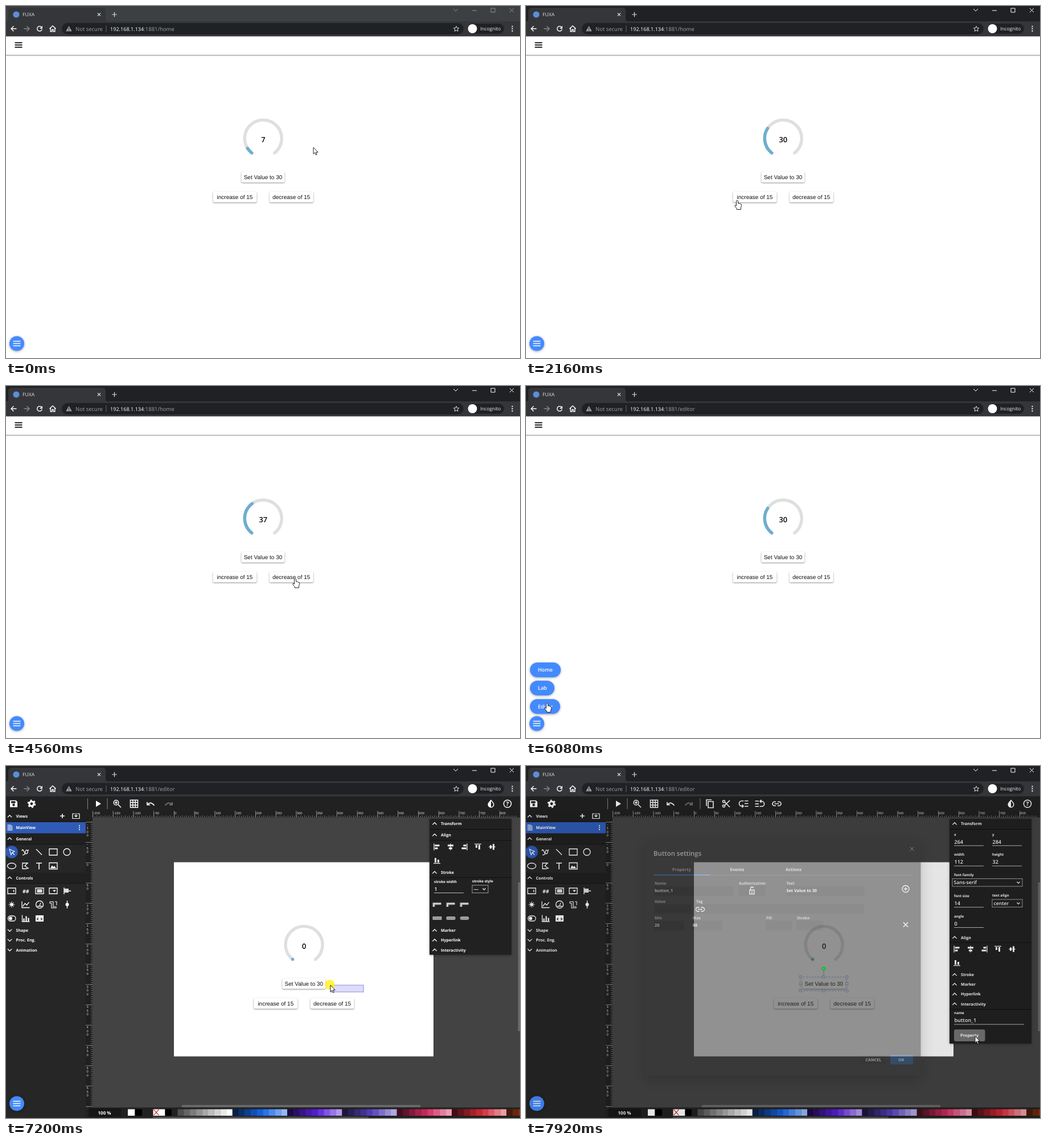
Animation of 903 by 620 pixels, one loop 8000 ms. Source, as an HTML page:

```html
<!DOCTYPE html>
<html lang="en">
<head>
<meta charset="utf-8">
<title>FUXA</title>
<style>
html, body { margin: 0; width: 100%; height: 100%; overflow: hidden; background: #fff; }
svg { display: block; width: 903px; height: 620px; font-family: "Open Sans", "Noto Sans", sans-serif; text-rendering: geometricPrecision; }
.btn { font: 10px "Liberation Sans", Arial, sans-serif; text-anchor: middle; fill: #111; }
.rule { font: 5.8px "Liberation Sans", Arial, sans-serif; fill: #ddd; }
.raised { filter: drop-shadow(0 1px 1.1px rgba(0,0,0,.45)); }
.float { filter: drop-shadow(0 1.5px 2px rgba(0,0,0,.35)); }
.deep { filter: drop-shadow(0 7px 12px rgba(0,0,0,.35)); }
</style>
</head>
<body>
<svg id="stage" viewBox="0 0 903 620"></svg>
<script>
const LOOP = 8000, STEP = 80;

// ---- drawing helpers
const rect = (x, y, w, h, fill, more = '') =>
  `<rect x="${x}" y="${y}" width="${w}" height="${h}" fill="${fill}" ${more}/>`;
const dot = (x, y, r, fill, more = '') =>
  `<circle cx="${x}" cy="${y}" r="${r}" fill="${fill}" ${more}/>`;
const ring = (x, y, r, w = 1.4) => dot(x, y, r, 'none', `stroke="#fff" stroke-width="${w}"`);
const text = (x, y, s, size = 7.1, fill = '#fff', more = '') =>
  `<text x="${x}" y="${y}" font-size="${size}" fill="${fill}" ${more}>${s}</text>`;
const bold = (x, y, s, size = 7.1, fill = '#fff') => text(x, y, s, size, fill, 'font-weight="700"');
const line = (x, y, d, c = '#fff', w = 1.3) =>
  `<path transform="translate(${x} ${y})" d="${d}" fill="none" stroke="${c}" stroke-width="${w}"/>`;
const solid = (x, y, d, c = '#fff') =>
  `<path transform="translate(${x} ${y})" d="${d}" fill="${c}" fill-rule="evenodd"/>`;
const group = (id, body, more = '') => `<g id="${id}" ${more}>${body}</g>`;
const range = (n, f) => Array.from({ length: n }, (_, i) => f(i)).join('');

const UP = 'M-3.7 1.9L0-1.8L3.7 1.9', DOWN = 'M-3.7-1.9L0 1.8L3.7-1.9';
const CROSS = 'M-3.5-3.5L3.5 3.5M3.5-3.5L-3.5 3.5';
const BARS = 'M-6.5-4H6.5M-6.5 0H6.5M-6.5 4H6.5';
const BOX = 'M-7-5.5H7V5.5H-7Z';
const LINK = 'M-1.5-3.5H-4A3.5 3.5 0 0 0-4 3.5H-1.5M1.5-3.5H4A3.5 3.5 0 0 1 4 3.5H1.5M-4 0H4';
const UNDO = 'M-6-3V2H-1M-5.5 1.5Q0-5 6.5 3';
const ORDER = 'M2-5H8.5M2-.3H8.5M2 4.5H8.5M.5-5H-3A4.6 4.6 0 0 0-3 4.2H-1M-2.6 1.6L0 4.2L-2.6 6.8';

// ---- browser frame
function chrome() {
  const grey = '#9aa0a6';
  return rect(0, 0, 903, 28, '#202124', 'id="bar"') +
    solid(0, 0, 'M0 27Q4 27 4 23V9Q4 3 10 3H169Q175 3 175 9V23Q175 27 179 27V28H0Z', '#35363a') +
    rect(0, 27, 903, 26.5, '#35363a') +
    dot(18, 15, 5.6, '#5b8fd6') + text(29, 18, 'FUXA', 8.6, '#dfe1e5') +
    line(163.5, 15, 'M-2.6-2.6L2.6 2.6M2.6-2.6L-2.6 2.6', '#e8eaed', 1.1) +
    line(190.5, 15, 'M-4.3 0H4.3M0-4.3V4.3', '#dfe1e5', 1.2) +
    group('wins', line(790, 7, 'M-4-2L0 2L4-2', 'currentColor', 1) +
      line(823, 8, 'M-4 0H4', 'currentColor', 1) +
      line(855.5, 7, 'M-3.5-3H3.5V4H-3.5Z', 'currentColor', 1) +
      line(888.5, 7.5, CROSS, 'currentColor', 1)) +
    line(13.5, 40, 'M5 0H-4.5M0-4.5L-4.5 0L0 4.5', '#fff', 1.4) +
    line(36.5, 40, 'M-5 0H4.5M0-4.5L4.5 0L0 4.5', '#85888c', 1.4) +
    line(59, 40, 'M3.3-2.8A4.3 4.3 0 1 0 4.2 1', '#fff', 1.4) + solid(59, 40, 'M5-5V0H0Z') +
    line(82, 40, 'M-5.5 0L0-5L5.5 0M-3.8-1V5H-1.2V1.5H1.2V5H3.8V-1', '#fff', 1.4) +
    rect(98, 30, 706, 20, '#202124', 'rx="10"') +
    solid(110.5, 40, 'M0-4.8L5.3 4.4H-5.3ZM-.6-1.8V1.2H.6V-1.8ZM-.6 2V3.2H.6V2Z', grey) +
    text(122, 43.6, 'Not secure', 9.5, grey) + rect(175.5, 34, 1, 12, '#5f6368') +
    text(183, 43.6, '192.168.1.134', 9.1, '#fff') +
    text(242.3, 43.6, '', 9.5, grey, 'id="path"') +
    line(791, 40.3, 'M0-4.8L1.4-1.6L4.8-1.4L2.2.8L3 4.2L0 2.4L-3 4.2L-2.2.8L-4.8-1.4L-1.4-1.6Z', '#dfe1e5', 1) +
    rect(811, 31, 64, 18, '#202124', 'rx="9"') + dot(819.5, 40, 8, '#fff') +
    text(833, 43.2, 'Incognito', 8.4, '#f1f3f4') +
    [36, 40, 44].map(y => dot(889.5, y, 1.2, '#e8eaed')).join('');
}

// ---- page shared by both screens
function button(i, x, y, w, label) {
  return rect(x, y, w, 18.8, '#fff', 'rx="2" class="raised"') +
    rect(x, y, w, 18.8, 'rgba(0,0,0,.07)', `rx="2" id="press${i}"`) +
    `<text class="btn" x="${x + w / 2}" y="${y + 13.2}">${label}</text>`;
}
function view() {
  const cx = 451.8, cy = 233.2, r = 32.5, a = 38 * Math.PI / 180;
  const dx = r * Math.sin(a), y = cy + r * Math.cos(a);
  const arc = (id, c) => `<path id="${id}" d="M${cx - dx} ${y}A${r} ${r} 0 1 1 ${cx + dx} ${y}"
    fill="none" stroke="${c}" stroke-width="5.4" stroke-linecap="round" pathLength="100"/>`;
  return arc('track', '#dfdfdf') + arc('fill', '#6fadcf') +
    text(cx, 240, '', 12.8, '#000', 'id="num" text-anchor="middle" font-weight="600"') +
    button(0, 413.5, 292, 76, 'Set Value to 30') +
    button(1, 363.5, 327, 77, 'increase of 15') +
    button(2, 462.8, 327, 77, 'decrease of 15');
}
function home() {
  return rect(0, 53, 903, 567, '#fff') + rect(0, 86, 903, 1.3, '#a0a0a0') +
    rect(0, 87.3, 903, 1.2, '#e2e2e2') + line(22, 68.7, BARS, '#000', 1.7);
}
function menu() {
  return [['Home', 487, 54], ['Lab', 519, 43], ['Editor', 551.5, 53]].map(([s, y, w]) =>
    rect(7, y, w, 26, '#448aff', 'rx="13" class="float"') +
    text(21, y + 16.4, s, 9, '#fff', 'font-weight="600"')).join('');
}

// ---- editor
function head(x, y, s, open = true) {
  return line(x, y, open ? UP : DOWN) + bold(x + 11, y + 2.6, s);
}
function rulers() {
  const u = 35.75;
  let s = rect(140, 79, 763, 11.5, '#202020') + rect(140, 79, 12, 522, '#202020');
  s += range(209, i => rect(152.2 + i * u / 10, i % 2 ? 88 : 87, .7, i % 2 ? 2.5 : 3.5, '#8a8a8a'));
  s += range(141, i => rect(149, 98.5 + i * u / 10, 3, .7, '#8a8a8a'));
  s += range(21, i => rect(152 + i * u, 79, .8, 11, '#aaa') +
    `<text class="rule" x="${153.3 + i * u}" y="85">${i * 50 - 200}</text>`);
  s += range(15, i => rect(140, 98.5 + i * u, 12, .8, '#999') +
    [...String(i * 50 - 100)].map((c, k) =>
      `<text class="rule" text-anchor="middle" x="143" y="${104.5 + i * u + k * 6.6}">${c}</text>`).join(''));
  return s;
}
function palette() {
  const hues = [[0, 0], [217, 82], [258, 75], [250, 48], [341, 66], [355, 68], [16, 75]];
  let s = rect(140, 601.5, 763, 18.5, '#212121') + rect(145, 603, 57, 15, '#161616') +
    bold(161.5, 613.5, '100 %', 8) + rect(214, 604.5, 12.5, 11.5, '#fff') +
    rect(226.5, 604.5, 12.5, 11.5, '#000') + rect(258.5, 604.5, 21, 11.5, '#fff') +
    line(264, 610.2, 'M-4.5-5L4.5 5M4.5-5L-4.5 5', '#d02030', 1.2) + rect(279.5, 604.5, 11.5, 11.5, '#000');
  s += range(57, i => {
    const [h, sat] = hues[Math.floor(i / 9)], k = i % 9;
    const l = sat ? 16 + k * 7.6 : 31 + k * 8.6;
    return rect(301.5 + i * 10.7, 604.5, 10.8, 11.5, `hsl(${h},${sat}%,${l}%)`);
  });
  return s + rect(258, 617.6, 379, 2.4, '#4a4a4a');
}
function tools() {
  const n = 'M-7-5H7V5H-7Z';
  return dot(10, 151.5, 11, '#2f5bb7') +
    line(10, 151.5, 'M-4-5L5-1L1 1L-1 5ZM1 1L5 5', '#fff', 1.1) +
    line(34, 151.5, 'M-6-2Q-5-6-3-2T0 3Q5 4 4-2Q1-6 0 0T-5 5M4-2L6-4') +
    line(58, 151.5, 'M-5-5L5 5') + line(83, 151.5, BOX) + ring(107, 151.5, 6, 1.3) +
    `<ellipse cx="10" cy="176" rx="7.5" ry="5" fill="none" stroke="#fff" stroke-width="1.3"/>` +
    line(34, 176, 'M-5-5H4L-1 0L5 4L1 5H-5Z') + line(58, 176, 'M-5-5H5M0-5V6', '#fff', 1.6) +
    line(83, 176, BOX) + solid(83, 176, 'M-5 4L-2-1L0 2L2 0L5 4Z') +
    line(10, 220, n) + line(10, 220, 'M3.5-2V2', '#fff', 1.4) + bold(29, 223.5, '##', 9) +
    line(59, 220, n) + rect(54.5, 217, 9, 6, '#ddd') + line(83, 220, n) + solid(83, 220, 'M-1-1.5H5L2 2Z') +
    line(107, 220, 'M-5-6V6M-5 0H7') + rect(102, 216, 8, 7, '#ddd') +
    dot(10, 244, 2.8, '#fff') + line(10, 244, 'M-5.5 0H5.5M0-5.5V5.5M-4-4L4 4M4-4L-4 4', '#fff', .9) +
    line(34.5, 244, 'M-6.5-5.5V5.5H7M-5 3L-1-2L2 1L6-4') +
    ring(59, 244, 6.5) + line(59, 244, 'M0 2L2-3M-4 3H4') +
    line(83, 244, 'M-6-5H0V4H6M-6-2H-3V6H6M-6-5V-2M3-5H6V1', '#fff', 1.1) +
    line(107.5, 244, 'M0-7V7') + dot(107.5, 244, 3, '#fff') +
    rect(3.5, 264, 13.5, 9, 'none', 'rx="4.5" stroke="#fff" stroke-width="1.3"') + dot(8, 268.5, 3, '#fff') +
    line(34.5, 268.5, 'M-6-6V5.5H7') + line(34.5, 268.5, 'M-3 5V0M1 5V-4M5 5V-1', '#fff', 2.2) +
    rect(52, 263, 14, 11, '#fff') + line(59, 269.5, 'M-2-2L-4.5 0L-2 2M2-2L4.5 0L2 2', '#222', 1.2);
}
function topBar() {
  const sep = x => rect(x, 57, 1, 19, '#8a8a8a');
  return rect(0, 53, 903, 26, '#212121') +
    solid(13.5, 66.5, 'M-6.5-6H4L6.5-3.5V6H-6.5ZM-4.5-4.5V-1H3V-4.5ZM-2 1A2 2 0 1 0 2 3A2 2 0 0 0-2 1Z') +
    ring(45, 66.5, 4, 3.2) +
    dot(45, 66.5, 6.2, 'none', 'stroke="#fff" stroke-width="2.2" stroke-dasharray="3 3.49"') +
    sep(143) + solid(162, 66.5, 'M-4-5.5L5 0L-4 5.5Z') + sep(177.5) +
    ring(193.5, 64.5, 4.3, 1.5) +
    line(195, 66, 'M2 2L7 7M-4-1.5H1M-1.5-4V1', '#fff', 1.6) +
    line(225, 66.5, 'M-6.5-6.5H6.5V6.5H-6.5ZM-2.2-6.5V6.5M2.2-6.5V6.5M-6.5-2.2H6.5M-6.5 2.2H6.5', '#fff', 1.5) +
    line(254, 66.5, UNDO, '#fff', 1.7) +
    `<g transform="matrix(-1 0 0 1 571 0)">${line(285, 66.5, UNDO, '#777', 1.7)}</g>` +
    solid(852, 66.5, 'M0-7.5L4-2.6A5.6 5.6 0 1 1-4-2.6ZM0-5V5.5A4.2 4.2 0 0 0 3-1.6Z') +
    ring(881, 66.5, 6.6, 1.5) + bold(878.4, 70.2, '?', 10) +
    group('selTools', sep(305.5) +
      line(323, 66.5, 'M-6 4V-7H3M-3-4H6V7H-3Z', '#fff', 1.6) +
      line(352, 66.5, 'M-3-3L6 6M-3 3L6-6', '#fff', 1.7) +
      ring(347.5, 62.5, 2, 1.5) + ring(347.5, 70.5, 2, 1.5) +
      line(382, 66.5, ORDER, '#fff', 1.6) +
      `<g transform="rotate(180 411 66.3)">${line(411, 66.3, ORDER, '#fff', 1.6)}</g>` +
      line(440.5, 66.5, LINK, '#fff', 1.7));
}
function editor() {
  return rect(0, 53, 903, 567, '#434343') + rect(295, 169.5, 456, 342, '#fff') +
    rulers() + rect(0, 79, 140, 541, '#262626') +
    [79, 119, 188].map(y => rect(0, y, 140, 19, '#202020') + rect(0, y + 18.5, 140, .8, '#111')).join('') +
    head(6.5, 88.5, 'Views') + line(99, 88, 'M-4 0H4M0-4V4', '#fff', 1.5) +
    line(123, 88, 'M-2-4H-6V4.5H6V-4H2M0-5V1M-2.5-1L0 1.5L2.5-1', '#fff', 1.2) +
    rect(0, 99, 140, 19.5, '#2f5bb7') + solid(7, 108.5, 'M-4.5-5.5H1.5L4.5-2.5V5.5H-4.5Z', '#8fa9dc') +
    bold(17.5, 111.2, 'MainView') + [105, 108.5, 112].map(y => dot(129, y, 1.1, '#fff')).join('') +
    head(6.5, 128, 'General') + head(6.5, 197, 'Controls') +
    head(6.5, 289.5, 'Shape', false) + head(6.5, 306.8, 'Proc. Eng.', false) +
    head(6.5, 324, 'Animation', false) + tools() + topBar() +
    rect(309, 597, 419, 4, '#686868') + rect(899.5, 205, 3.5, 262, '#686868') + palette();
}

// ---- property panel
const panelBox = h => rect(744, 93, 144, h, '#212121', 'class="float" rx="1"');
const field = (x, y, name, val, w = 52) =>
  bold(x, y, name, 6.3) + text(x + .5, y + 14, val, 9, '#fff', 'font-weight="600"') + rect(x, y + 17.3, w, .9, '#ccc');
const pick = (x, y, w, s) => rect(x, y, w, 13.5, 'none', 'stroke="#aaa" stroke-width=".9"') +
  text(x + 2.5, y + 9.7, s, 8.6, '#fff', 'font-weight="600"') + line(x + w - 7, y + 6.8, 'M-2.6-1.4L0 1.4L2.6-1.4', '#fff', 1.2);
const rulesAt = ys => ys.map(y => rect(744, y, 144, .9, '#0e0e0e')).join('');
function aligns(y) {
  const a = (x, y, turn) => `<g transform="translate(${x} ${y}) rotate(${turn})">` +
    line(0, 0, 'M-5-6V6', '#fff', 1.2) + rect(-3.5, -4, 8, 3, '#fff') + rect(-3.5, 1, 5, 3, '#fff') + '</g>';
  const mid = (x, turn) => `<g transform="translate(${x} ${y}) rotate(${turn})">` +
    line(0, 0, 'M0-6V6', '#fff', 1) + rect(-5, -4, 10, 3, '#fff') + rect(-3, 1, 6, 3, '#fff') + '</g>';
  return a(757, y, 0) + mid(781, 0) + a(805, y, 180) + a(829, y, 90) + mid(854, 90) + a(757, y + 24, -90);
}
function idlePanel() {
  return panelBox(239.5) + rulesAt([111, 130.5, 196]) + head(753, 101.5, 'Transform') + head(753, 121.5, 'Align') +
    aligns(142.5) + head(753, 187.5, 'Stroke') + field(752, 205.7, 'stroke width', '1') +
    bold(819, 205, 'stroke style', 6.3) + pick(819, 210, 28, '—') +
    [757, 781, 805].map((x, i) => line(x, 244, 'M-5.5 4V-1.5H7.5', '#aaa', 4) +
      line(x, 244, 'M-5.5 4V-1.5H7.5', '#eee', 1) +
      rect(x - 7, 265.5, 15, 5, '#999', `rx="${i * 1.3}" stroke="#ccc" stroke-width=".7"`)).join('') +
    head(753, 289.5, 'Marker') + head(753, 306.8, 'Hyperlink') + head(753, 324, 'Interactivity');
}
function selPanel() {
  return panelBox(396) + rulesAt([111, 310.5, 428]) + head(753, 101.5, 'Transform') +
    field(752, 122.5, 'x', '264') + field(819, 122.5, 'y', '284') +
    field(752, 158.3, 'width', '112') + field(819, 158.3, 'height', '32') +
    bold(752, 193.5, 'font family', 6.3) + pick(749, 198.5, 123, 'Sans-serif') +
    field(752, 231, 'font size', '14') + bold(819, 230, 'text align', 6.3) + pick(819, 235, 53, 'center') +
    field(752, 266.7, 'angle', '0') + head(753, 302, 'Align') + aligns(322.5) +
    head(753, 367.5, 'Stroke') + head(753, 384.5, 'Marker') + head(753, 401.8, 'Hyperlink') +
    head(753, 419, 'Interactivity') + field(752, 437.3, 'name', 'button_1', 123) +
    rect(752, 464, 54.5, 21, '#4a4a4a', 'rx="3" id="prop"') + bold(763, 477.4, 'Property', 7.4);
}
function selection() {
  const c = '#7d9fd8';
  let s = rect(482, 371.5, 82, 24.5, 'none', `stroke="${c}" stroke-width=".7" stroke-dasharray="3 2"`) +
    line(523, 357, 'M0 0V14', c, .7);
  for (const x of [482, 523, 564]) for (const y of [371.5, 383.7, 396])
    if (x !== 523 || y !== 383.7) s += rect(x - 2, y - 2, 4, 4, '#fff', `stroke="${c}" stroke-width=".7"`);
  return s;
}
function dialog() {
  const cell = (x, y, w, name, val = '') => rect(x, y, w, 17, '#242424', 'opacity=".5"') +
    bold(x + 1, y - 2.4, name, 6.8, '#ccc') + bold(x + 1, y + 10, val, 7.3);
  return rect(210, 130.5, 483.5, 415, '#373737', 'rx="2" class="deep"') +
    text(224, 158.3, 'Button settings', 11.4, '#fff', 'font-weight="600"') + line(678, 146, CROSS, '#ccc', 1) +
    bold(257, 185, 'Property', 7.5, '#bbb') + bold(358.5, 185, 'Events', 7.5, '#ddd') +
    bold(456, 185, 'Actions', 7.5, '#ddd') +
    rect(224, 192, 456, .8, '#5c5c5c') + rect(224, 191, 99, 1.6, '#3f78d8') +
    cell(225, 211.5, 139, 'Name', 'button_1') + cell(373, 211.5, 48, 'Authorization') +
    line(397, 219.5, 'M-4-1H4V6H-4ZM-2.5-1V-4A2.5 2.5 0 0 1 2.5-4') + dot(397, 222, 1.2, '#fff') +
    cell(456.5, 211.5, 138, 'Text', 'Set Value to 30') +
    ring(667, 216.5, 6, 1.3) + line(667, 216.5, 'M-3.2 0H3.2M0-3.2V3.2') +
    cell(225, 243.5, 65, 'Value') + cell(298, 243.5, 296, 'Tag') + line(306, 252.5, LINK, '#fff', 1.3) +
    cell(225, 272.5, 53, 'Min', '20') + cell(291.5, 272.5, 53, 'Max', '80') +
    cell(421, 272.5, 47, 'Fill') + cell(475, 272.5, 47, 'Stroke') + line(667, 279.5, 'M-4-4L4 4M4-4L-4 4', '#fff', 1.6) +
    rect(588, 509, 45, 16.5, '#333', 'rx="2"') + bold(596.5, 519.8, 'CANCEL') +
    rect(640, 509, 40, 16.5, '#2f5f98', 'rx="2"') + bold(654, 519.8, 'OK');
}

document.getElementById('stage').innerHTML =
  group('home', home()) + group('editor', editor()) + group('view', view()) +
  group('selBox', selection()) + rect(0, 0, 0, 0, 'rgba(100,100,230,.22)', 'id="band" stroke="#7070d8" stroke-width=".8"') +
  group('idle', idlePanel()) + group('selPanel', selPanel()) + group('menu', menu()) +
  dot(19, 594.5, 13, '#448aff', 'class="float"') + line(19, 594.5, BARS, '#fff', 1.4) +
  group('modal', rect(0, 53, 903, 567, 'rgba(0,0,0,.1)') + `<g opacity=".48">${dialog()}</g>`) +
  dot(523, 357, 2.9, '#12dc2c', 'id="knob" stroke="#0a8a1c" stroke-width=".6"') +
  chrome() +
  group('cursor', dot(-1, -.8, 8.7, 'rgba(255,242,0,.75)', 'id="glow"') +
    `<path id="shape" fill="#fff" stroke="#111" stroke-width=".9" stroke-linejoin="round"/>`);

// ---- timeline
const ARROW = 'M0 0V11.6L2.7 9.1L4.4 13.3L6.3 12.5L4.6 8.5H8.2Z';
const HAND = 'M-1.5 1Q0-1 1.5 1V5.5Q3.4 4.4 4.2 6.2Q5 5.4 6 7Q7.9 6.5 7.6 9.5L6.4 14V16.5H-.6V15L-4 10.5Q-4.6 8.3-2.8 8.6L-1.5 10Z';
const PATH = [
  [0, 540, 249], [80, 538.5, 249.5], [160, 538.5, 249.5], [480, 443, 296], [1520, 443, 296],
  [2080, 371, 346], [2160, 371, 342], [2400, 379, 335], [3360, 379, 335], [3560, 440, 361],
  [3760, 508, 339], [4720, 508, 339], [5360, 36, 594], [5520, 21, 594], [5680, 21, 594],
  [5920, 37, 558], [6080, 37, 558], [6240, 162, 542], [6640, 636, 276], [6880, 649, 330],
  [6960, 628, 398], [7040, 628, 398], [7200, 570, 386], [7280, 548, 381], [7360, 548, 381],
  [7600, 790, 494], [7680, 789, 476], [8000, 789, 476]];
const PRESS = [[560, 1120], [2720, 2800], [4080, 4320], [5600, 5680], [5920, 6000], [6960, 7360], [7840, 7920]];
const GAUGE = [[1360, 30], [2960, 45], [4560, 30]];
const HOT = [[413, 292, 490, 311], [363, 327, 441, 347], [462, 327, 540, 347], [6, 581, 32, 608]];
const PILL = [7, 551, 60, 578];

const $ = id => document.getElementById(id);
const show = (id, on) => { $(id).style.display = on ? '' : 'none'; };
const within = (t, [a, b]) => t >= a && t < b;

function pointer(t) {
  const i = PATH.findIndex(k => k[0] > t);
  const [a, x, y] = PATH[i - 1], [b, x2, y2] = PATH[i];
  const u = (t - a) / (b - a), e = u * u * (3 - 2 * u);
  return [x + (x2 - x) * e, y + (y2 - y) * e];
}
// each step closes a fixed share of the remaining gap
function level(t) {
  let v = 7;
  for (const [at, to] of GAUGE)
    if (t >= at) v = to + (v - to) * Math.pow(.47, (t - at) / STEP + 1);
  return v;
}

function draw(t) {
  const edit = t >= 6160, picked = t >= 7360, focus = t >= 560;
  const v = edit ? 0 : level(t), [x, y] = pointer(t);
  $('bar').setAttribute('fill', focus ? '#202124' : '#3c4043');
  $('wins').style.color = focus ? '#fff' : '#8f9296';
  $('path').textContent = t >= 6000 ? ':1881/editor' : ':1881/home';

  show('home', !edit);
  show('editor', edit);
  show('selTools', picked);
  show('selBox', picked);
  show('knob', picked);
  show('idle', edit && !picked);
  show('selPanel', picked);
  show('modal', t >= 7920);
  $('prop').setAttribute('fill', t >= 7680 ? '#747474' : '#4a4a4a');
  $('view').setAttribute('transform', edit ? 'translate(71.8 81.7)' : '');
  $('fill').setAttribute('stroke-dasharray', `${v} 200`);
  $('num').textContent = Math.round(v);
  for (let i = 0; i < 3; i++) show('press' + i, within(t, PRESS[i]));

  const open = t >= 5600 && !edit;
  show('menu', open);
  $('menu').style.opacity = Math.min(1, (t - 5520) / 240);

  const band = within(t, PRESS[5]);
  show('band', band);
  if (band) {
    const size = { x, y, width: 628 - x, height: 398 - y };
    for (const k in size) $('band').setAttribute(k, size[k]);
  }

  const hot = open ? [...HOT, PILL] : HOT;
  const hand = !edit && hot.some(([l, tp, r, b]) => x >= l && x <= r && y >= tp && y <= b);
  $('cursor').setAttribute('transform', `translate(${x} ${y})`);
  $('shape').setAttribute('d', hand ? HAND : ARROW);
  show('glow', PRESS.some(p => within(t, p)));
}

const start = performance.now();
function tick() {
  const t = Math.max(0, performance.now() - start) % LOOP;
  draw(Math.floor(t / STEP) * STEP);
  requestAnimationFrame(tick);
}
tick();
</script>
</body>
</html>
```
